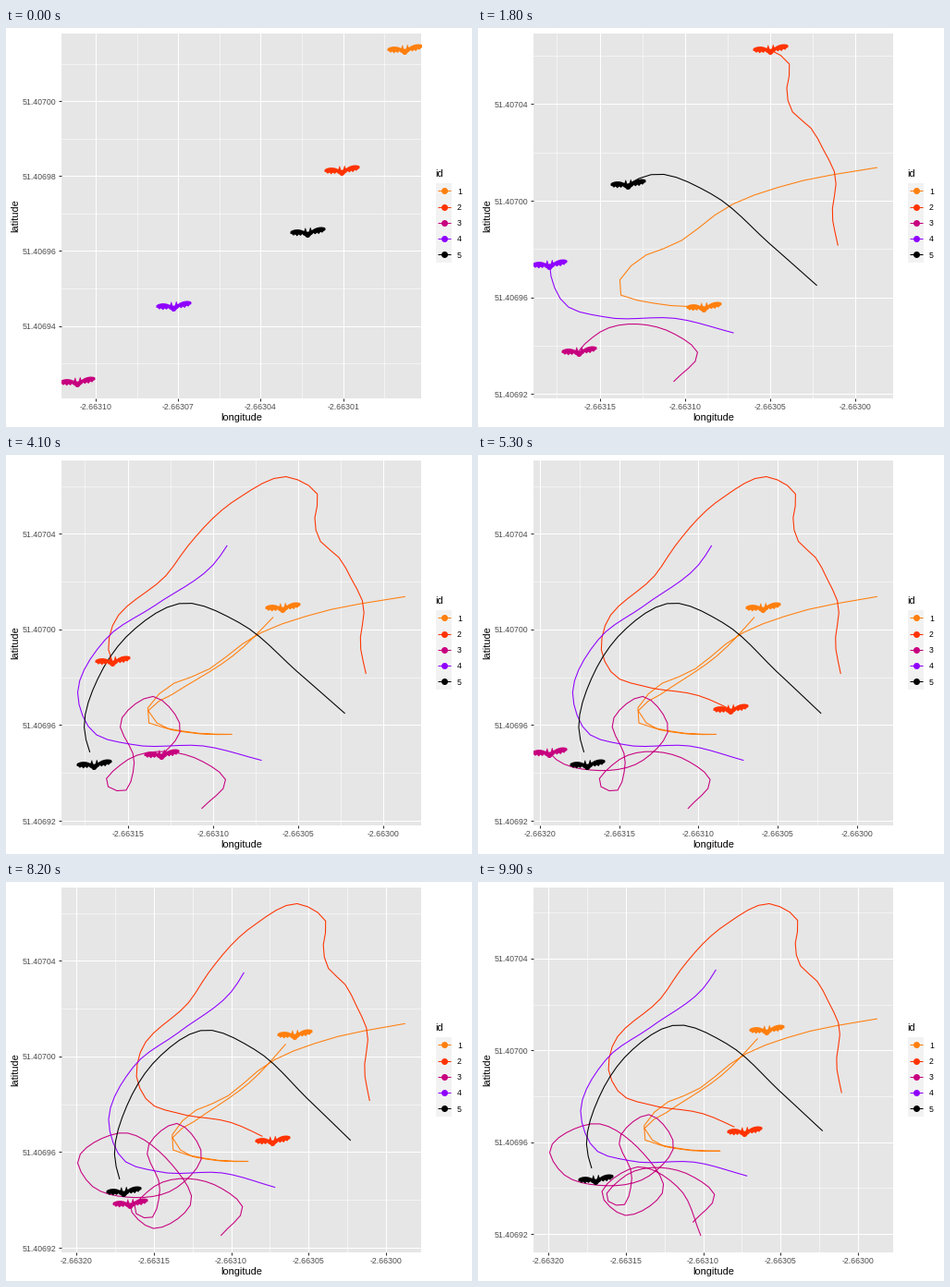
Animation, 504 px wide and 432 px high, one loop 10000 ms. Source, as a matplotlib script:

```python
import math
import matplotlib.pyplot as plt
import numpy as np
from matplotlib.animation import FuncAnimation
from matplotlib.patches import Rectangle

W, H, DPI = 504, 432, 72
FRAMES = 100
LON0, LAT0 = -2663000, 51407000          # micro-degrees
MAP_ORIGIN = np.array([408.2, 188.5])    # map units at (LON0, LAT0)
MAP_SCALE = np.array([1.842, -2.588])    # map units per micro-degree

plt.rcParams["font.family"] = "Liberation Sans"
plt.rcParams["axes.unicode_minus"] = False


def smooth(points, n=3000):
    """Cubic Hermite curve through the points, by chord length."""
    p = np.array(points, float)
    t = np.r_[0, np.cumsum(np.hypot(*np.diff(p, axis=0).T))]
    m = np.gradient(p, t, axis=0)
    s = np.linspace(0, t[-1], n)
    i = np.clip(np.searchsorted(t, s, side="right") - 1, 0, len(t) - 2)
    h = (t[i + 1] - t[i])[:, None]
    u = (s - t[i])[:, None] / h
    return ((1 + 2 * u) * (1 - u) ** 2 * p[i] + u * (1 - u) ** 2 * h * m[i]
            + u * u * (3 - 2 * u) * p[i + 1] + u * u * (u - 1) * h * m[i + 1])


class Flight:
    """One fix per frame along a smooth route; ease < 1 starts fast."""

    def __init__(self, color, last, route, ease=1.0, stays=True):
        curve = smooth(route)
        run = np.r_[0, np.cumsum(np.hypot(*np.diff(curve, axis=0).T))]
        s = np.linspace(0, 1, last + 1) ** ease * run[-1]
        fixes = np.column_stack([np.interp(s, run, c) for c in curve.T])
        self.fixes = (fixes - MAP_ORIGIN) / MAP_SCALE
        self.color, self.last, self.stays = color, last, stays

    def seen(self, t):
        return self.fixes[:t + 1]

    def trail(self, t):
        return self.fixes[:-1] if t > self.last and self.stays else self.seen(t)

    def visible(self, t):
        return self.stays or t <= self.last


FLIGHTS = [
    Flight("#FF7F0E", 36, [
        (431, 153), (343, 169), (270, 195), (217, 233), (169, 255), (150, 284),
        (194, 299), (245, 302), (197, 300), (165, 291), (154, 276), (178, 260),
        (248, 215), (299, 165)], ease=.75),
    Flight("#FF3300", 54, [
        (389, 236), (383, 206), (386, 160), (374, 135), (361, 112), (338, 90),
        (334, 64), (338, 46), (308, 24), (249, 48), (197, 98), (176, 127),
        (115, 186), (111, 209), (126, 238), (161, 250), (224, 260), (273, 280)]),
    Flight("#C7007F", 98, [
        (212, 382), (238, 353), (208, 329), (131, 330), (108, 356), (127, 364),
        (139, 331), (124, 288), (160, 261), (189, 295), (158, 331), (106, 341),
        (55, 326), (41, 304), (95, 271), (151, 303), (177, 345), (128, 374),
        (103, 352), (145, 320), (198, 347), (221, 397)], stays=False),
    Flight("#8F00FF", 36, [
        (276, 330), (217, 315), (137, 313), (95, 300), (78, 261), (109, 198),
        (162, 162), (228, 114), (239, 98)], stays=False),
    Flight("#000000", 32, [
        (366, 279), (317, 236), (252, 181), (191, 160), (136, 191), (101, 239),
        (85, 296), (95, 334)]),
]


def bat_outline(half=19):
    """Two scalloped wings, the right one raised, with ears and a body."""
    x = np.linspace(-half, half, 77)
    a = np.abs(x)
    wing = np.sin(np.pi * np.clip((a / half - .2) / .8, 0, 1)) ** .6
    mid = np.where(x > 0, .2 * x, 0)
    ears = 5 * np.clip(1 - np.abs(a - 2.7) / 1.5, 0, 1)
    body = 4.5 * np.clip(1.3 - a / 4.5, 0, 1)
    top = mid + .8 + 2.6 * wing + ears
    bottom = mid - 1 - wing * (2 + .8 * np.cos(1.6 * x)) - body
    return np.r_[np.c_[x, top], np.c_[x, bottom][::-1]]


def breaks(lo, hi, m=5):
    """Extended Wilkinson labelling: returns (first break, step, count)."""
    nice = [1, 5, 2, 2.5, 4, 3]
    span, best, pick = hi - lo, -9, None
    for j in range(1, 4):
        for rank, q in enumerate(nice):
            simple = 1 - rank / 5 - j + 1
            for k in range(2, 10):
                z0 = math.ceil(math.log10(span / (k + 1) / j / q))
                for z in (z0, z0 + 1):
                    step = j * q * 10.0 ** z
                    first = math.floor(hi / step) * j - (k - 1) * j
                    last = math.ceil(lo / step) * j
                    for n in range(first, last + 1):
                        a = n * step / j
                        b = a + step * (k - 1)
                        cover = 1 - .5 * ((hi - b) ** 2 + (lo - a) ** 2) / (.1 * span) ** 2
                        r = (k - 1) / (b - a)
                        rt = (m - 1) / (max(b, hi) - min(a, lo))
                        dense = 2 - max(r / rt, rt / r)
                        score = .25 * simple + .2 * cover + .5 * dense + .05
                        if score > best + 1e-9:
                            best, pick = score, (a, step, k)
    return pick


def labels(values, digits):
    """Shortest common number of decimals, at most digits."""
    unit = 10 ** (6 - digits)
    r = [math.floor(v / unit + .5) for v in values]
    d = digits
    while d > 0 and all(v % 10 ** (digits - d + 1) == 0 for v in r):
        d -= 1
    return [f"{v / 10 ** digits:.{d}f}" for v in r]


def set_scale(axis, set_lim, lo, hi, base, digits):
    pad = .05 * (hi - lo)
    lo, hi = lo - pad, hi + pad
    set_lim(lo, hi)
    a, step, k = breaks(lo + base, hi + base)
    major = a - base + step * np.arange(k)
    minor = a - base + step * (np.arange(k + 1) - .5)
    major = major[(major >= lo) & (major <= hi)]
    minor = minor[(minor >= lo) & (minor <= hi)]
    axis.set_ticks(major, labels=labels(major + base, digits))
    axis.set_ticks(minor, minor=True)


fig = plt.figure(figsize=(W / DPI, H / DPI), dpi=DPI, facecolor="white")

page = fig.add_axes([0, 0, 1, 1])
page.set(xlim=(0, W), ylim=(H, 0))
page.axis("off")
page.text(254.3, 424.8, "longitude", size=11, ha="center", va="baseline")
page.text(13.4, 203, "latitude", size=11, rotation=90, ha="center",
          va="baseline", rotation_mode="anchor")
page.text(464.4, 161, "id", size=11, va="baseline")
for n, flight in enumerate(FLIGHTS):
    y, color = 176.3 + 17.28 * n, flight.color
    page.add_patch(Rectangle((465, y - 8.64), 17.28, 17.28, fc="#F2F2F2", lw=0))
    page.plot([466.9, 480.6], [y, y], color=color, lw=1.07, solid_capstyle="butt")
    page.plot([473.7], [y], "o", color=color, ms=7, mew=0)
    page.text(487.8, y + 3.2, str(n + 1), size=8.8, va="baseline")

ax = fig.add_axes([59.8 / W, (H - 400.5) / H, 389.2 / W, 395 / H])
ax.set_facecolor("#E6E6E6")
ax.set_axisbelow(True)
ax.spines[:].set_visible(False)
ax.tick_params(which="major", length=2.75, width=1.07, pad=2.4,
               color="#333333", labelcolor="#4D4D4D", labelsize=8.8)
ax.tick_params(which="minor", length=0)
ax.grid(which="major", color="white", lw=1.07)
ax.grid(which="minor", color="white", lw=.53)

lines = [ax.plot([], [], color=f.color, lw=1.07, zorder=3)[0] for f in FLIGHTS]
bats = [ax.plot([], [], marker=bat_outline(), ms=38, mew=0, color=f.color,
                ls="", zorder=4)[0] for f in FLIGHTS]


def update(t):
    seen = np.vstack([f.seen(t) for f in FLIGHTS])
    (x0, y0), (x1, y1) = seen.min(axis=0), seen.max(axis=0)
    set_scale(ax.xaxis, ax.set_xlim, x0, x1, LON0, 6)
    set_scale(ax.yaxis, ax.set_ylim, y0, y1, LAT0, 5)
    for flight, line, bat in zip(FLIGHTS, lines, bats):
        line.set_data(*flight.trail(t).T)
        bat.set_data(*flight.seen(t)[-1:].T)
        bat.set_visible(flight.visible(t))
    return lines + bats


anim = FuncAnimation(fig, update, frames=FRAMES, interval=100,
                     repeat=True, repeat_delay=0, blit=False)
plt.show()
```
